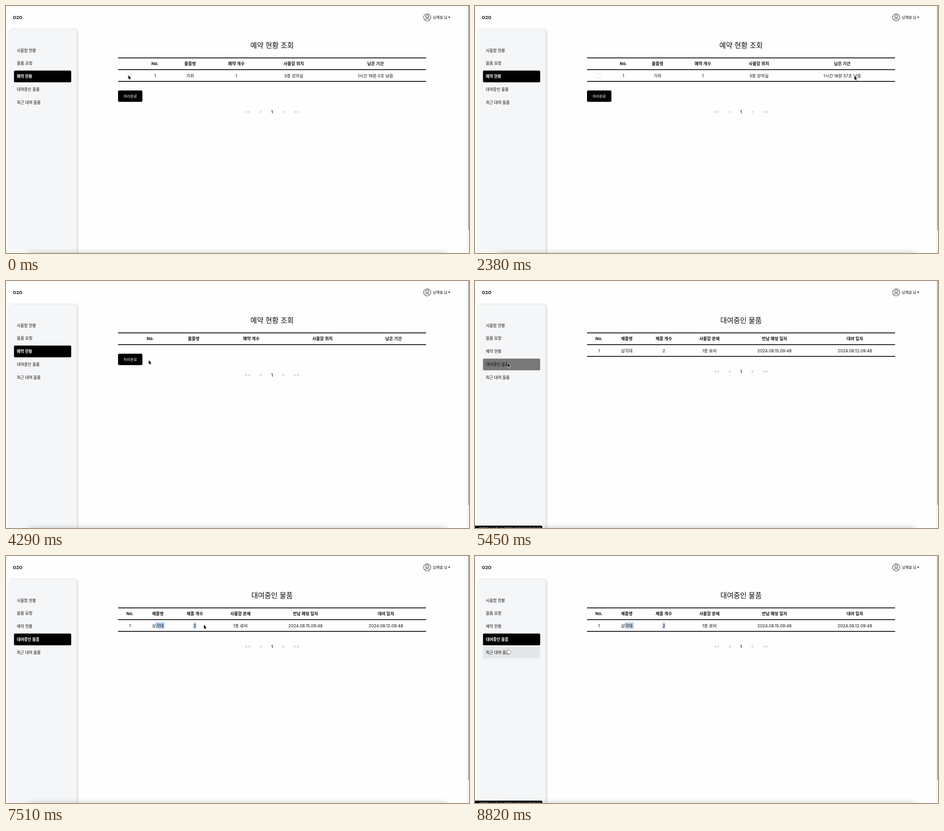
These frames come from a looping animation (1025x547 px, 8.89 s). An HTML page with a canvas:

```html
<!DOCTYPE html>
<html lang="ko">
<head>
<meta charset="utf-8">
<title>예약 현황</title>
<style>
  html, body { margin: 0; width: 100%; height: 100%; overflow: hidden; background: #fefefe; }
  canvas { display: block; width: 1025px; height: 547px; }
</style>
</head>
<body>
<canvas id="stage"></canvas>
<script>
const W = 1025, H = 547, LOOP = 8890;
const FONT = 'Inter, "Noto Sans CJK KR", "Noto Sans CJK", sans-serif';
const canvas = document.getElementById('stage');
const ratio = window.devicePixelRatio || 1;
canvas.width = W * ratio;
canvas.height = H * ratio;
const ctx = canvas.getContext('2d');
ctx.scale(ratio, ratio);

// Moments at which the state changes
const FIRST_TICK = 1050, TICK = 533;
const CHECKED = 3130, COMPLETED = 3540, PAGE_SWITCH = 5380, SELECT = 5940;
const LINK_HOVERS = [[5180, 5720], [8060, 9200]];

const MENU = ['사물함 현황', '물품 요청', '예약 현황', '대여중인 물품', '최근 대여 물품'];
const menuY = i => 98.5 + i * 28.75;

const RESERVED = ['No.', '물품명', '예약 개수', '사물함 위치', '남은 기간'];
const RENTED = ['No.', '제품명', '제품 개수', '사물함 본체', '반납 예정 일자', '대여 일자'];
const COLUMNS = {
  wide: [330, 407.5, 510, 637, 818],
  narrow: [328.5, 404, 504.5, 628.5, 813],
  empty: [319.5, 415.5, 543, 700.5, 858],
  rented: [274.5, 336, 418, 519, 663, 841]
};

// Pointer stops: time, x, y
const POINTER = [
  [0, 271, 153.5], [1050, 271, 153.5], [1220, 400, 190], [1380, 620, 165],
  [1520, 620, 165], [1660, 704.5, 146], [2000, 780, 150], [2380, 840, 155],
  [2650, 840, 155], [3060, 271, 152.5], [3270, 271, 152.5], [3470, 276, 200],
  [4010, 276, 200], [4290, 316, 175.5], [4630, 229, 166], [5050, 229, 166],
  [5300, 72.5, 182], [5560, 72.5, 182], [5870, 331, 153], [5940, 331, 153],
  [6360, 502, 153], [6900, 502, 153], [7510, 438, 152.5], [7650, 438, 152.5],
  [8150, 76, 188], [8400, 76, 188], [8700, 73, 205.5], [LOOP, 73, 205.5]
];

const clamp = v => Math.max(0, Math.min(1, v));
const smooth = v => v * v * (3 - 2 * v);

function pointerAt(t) {
  const next = POINTER.findIndex(stop => stop[0] > t);
  const [t0, x0, y0] = POINTER[next - 1], [t1, x1, y1] = POINTER[next];
  const k = smooth((t - t0) / (t1 - t0));
  return { x: x0 + (x1 - x0) * k, y: y0 + (y1 - y0) * k };
}

function text(str, x, y, { size = 9.3, weight = 400, color = '#111', align = 'center' } = {}) {
  ctx.font = `${weight} ${size}px ${FONT}`;
  ctx.fillStyle = color;
  ctx.textAlign = align;
  ctx.fillText(str, x, y + size * 0.37);
}

function box(x, y, w, h, radius, fill) {
  ctx.beginPath();
  ctx.roundRect(x, y, w, h, radius);
  ctx.fillStyle = fill;
  ctx.fill();
}

function drawHeader() {
  text('O2O', 15.3, 25.3, { size: 9.6, weight: 700, align: 'left' });
  ctx.strokeStyle = '#333';
  ctx.lineWidth = 1;
  ctx.beginPath();
  ctx.arc(932.5, 25.2, 8, 0, 7);
  ctx.fillStyle = '#f1f1f1';
  ctx.fill();
  ctx.stroke();
  ctx.beginPath();
  ctx.arc(932.5, 22.8, 3.3, 0, 7);
  ctx.stroke();
  ctx.beginPath();
  ctx.moveTo(927, 31);
  ctx.quadraticCurveTo(932.5, 23.8, 938, 31);
  ctx.stroke();
  text('남채솔 님', 945, 25.2, { size: 8.1, align: 'left' });
  ctx.fillStyle = '#111';
  ctx.beginPath();
  ctx.moveTo(978.5, 23.8);
  ctx.lineTo(983.8, 23.8);
  ctx.lineTo(981.1, 26.6);
  ctx.fill();
}

function drawSidebar(t, hovered, active) {
  ctx.save();
  ctx.shadowColor = 'rgba(0,0,0,.2)';
  ctx.shadowBlur = 4 * ratio;
  ctx.shadowOffsetX = 1.5 * ratio;
  box(6, 52, 151, 510, 6, '#f5f6f8');
  ctx.restore();
  MENU.forEach((label, i) => {
    const y = menuY(i);
    let color = '#111', weight = 400;
    if (i === active) {
      const fade = i === 3 ? clamp((t - PAGE_SWITCH) / 150) : 1;
      const shade = Math.round(228 * (1 - fade));
      box(17.7, y - 13, 126.6, 26, 2.5, `rgb(${shade},${shade},${shade})`);
      if (fade > 0.6) { color = '#fff'; weight = 700; }
    } else if (i === hovered) {
      box(17.7, y - 13, 126.6, 26, 2.5, '#e4e6e8');
    }
    text(label, 24, y, { size: 8.7, weight, color, align: 'left' });
  });
}

function drawTable(title, heads, columns, cells) {
  text(title, 589, 87, { size: 15.8 });
  ctx.fillStyle = '#0a0a0a';
  const lines = cells ? [114, 140, 166] : [114, 140];
  lines.forEach(y => ctx.fillRect(248, y, 682, 1.8));
  heads.forEach((head, i) => text(head, columns[i], 128, { weight: 700 }));
  if (cells) cells.forEach((cell, i) => text(cell, columns[i], 154.2));
}

function drawPager(y) {
  const gray = { color: '#a8a8a8' };
  text('<<', 535, y, gray);
  text('<', 564, y, gray);
  text('1', 589, y, { weight: 500 });
  text('>', 614, y, gray);
  text('>>', 643, y, gray);
}

function drawCheckbox(checked) {
  if (checked) box(265.5, 147, 14, 14, 4, 'rgba(13,110,253,.28)');
  box(268, 149.5, 9, 9, 2, checked ? '#2f73e8' : '#fff');
  ctx.lineWidth = checked ? 1.2 : 0.7;
  ctx.strokeStyle = checked ? '#fff' : '#d4d4d4';
  if (checked) {
    ctx.beginPath();
    ctx.moveTo(270, 154);
    ctx.lineTo(272, 156);
    ctx.lineTo(275.3, 152);
  }
  ctx.stroke();
}

function drawReservations(t) {
  const done = t >= COMPLETED;
  const ticks = Math.max(0, Math.floor((t - FIRST_TICK) / TICK) + 1);
  const remaining = 79 * 60 - ticks;
  const clock = `1시간 ${Math.floor(remaining / 60) - 60}분 ${remaining % 60}초 남음`;
  const columns = done ? COLUMNS.empty : ticks ? COLUMNS.narrow : COLUMNS.wide;
  drawTable('예약 현황 조회', RESERVED, columns, done ? null : ['1', '가위', '1', '3층 강의실', clock]);
  if (!done) drawCheckbox(t >= CHECKED);
  const lift = done ? 26 : 0;
  box(248, 187 - lift, 54, 25.3, 3, '#000');
  text('처리완료', 275, 199.6 - lift, { size: 8.1, color: '#fff' });
  drawPager(235 - lift);
}

function drawRentals(t, pointer) {
  if (t >= SELECT) {
    const reach = t < 6360 ? pointer.x : 502;
    ctx.fillStyle = t < 8400 ? '#b7d2f3' : '#c6d5e8';
    ctx.fillRect(332, 147, Math.min(19.5, Math.max(0, reach - 332)), 14);
    if (reach > 418) ctx.fillRect(415, 147, 6, 14);
  }
  drawTable('대여중인 물품', RENTED, COLUMNS.rented,
    ['1', '삼각대', '2', '1층 로비', '2024.08.15.09:48', '2024.08.12.09:48']);
  drawPager(200.5);
}

function drawWindowEdges(t) {
  ctx.fillStyle = '#e9e9e9';
  ctx.fillRect(1021, 0, 1, H);
  ctx.fillStyle = '#fafafa';
  ctx.fillRect(1022, 0, 3, H);
  box(1023.6, -5, 4, 502, 2, '#8c8c8c');
  ctx.save();
  ctx.shadowColor = 'rgba(0,0,0,.3)';
  ctx.shadowBlur = 14 * ratio;
  ctx.fillRect(50, 549, 925, 20);
  ctx.restore();
  for (const [start, end] of LINK_HOVERS) {
    if (t < start || t > end) continue;
    ctx.globalAlpha = Math.min(clamp((t - start) / 150), clamp((end - t) / 150));
    box(-4, 541.8, 153, 16, 3, '#050505');
    text('11d101.p.ssafy.io:3001/web/item/notrefund', 145, 547.2, { size: 6.8, color: '#ddd', align: 'right' });
    ctx.globalAlpha = 1;
  }
}

const ARROW = new Path2D('M0 0V8.4L1.9 6.7L3.2 9.8L4.6 9.2L3.3 6.2L5.9 6Z');
const HAND = new Path2D('M-1 1Q0-1 1 1V4Q2 3 3 4Q4 3.2 5 4.4Q6.5 4 6.2 6.5Q6 9 4.6 11H-.2Q-1.4 8.8-3.5 6.8Q-3.2 5-1 6.6Z');

function drawPointer({ x, y }, isHand) {
  ctx.save();
  ctx.translate(x, y);
  ctx.lineJoin = 'round';
  ctx.lineWidth = isHand ? 0.9 : 1.4;
  ctx.strokeStyle = isHand ? '#222' : '#fff';
  ctx.fillStyle = isHand ? '#fff' : '#000';
  const shape = isHand ? HAND : ARROW;
  ctx.stroke(shape);
  ctx.fill(shape);
  ctx.restore();
}

function draw(now) {
  const t = now % LOOP;
  const pointer = pointerAt(t);
  const active = t < PAGE_SWITCH ? 2 : 3;
  const hovered = pointer.x > 18 && pointer.x < 144
    ? MENU.findIndex((_, i) => Math.abs(pointer.y - menuY(i)) < 13) : -1;
  ctx.fillStyle = '#fefefe';
  ctx.fillRect(0, 0, W, H);
  drawHeader();
  drawSidebar(t, hovered, active);
  if (active === 2) drawReservations(t);
  else drawRentals(t, pointer);
  drawWindowEdges(t);
  drawPointer(pointer, hovered >= 0 && hovered !== active);
}

const startTime = performance.now();
function frame() {
  draw(performance.now() - startTime);
  requestAnimationFrame(frame);
}
frame();
</script>
</body>
</html>
```
